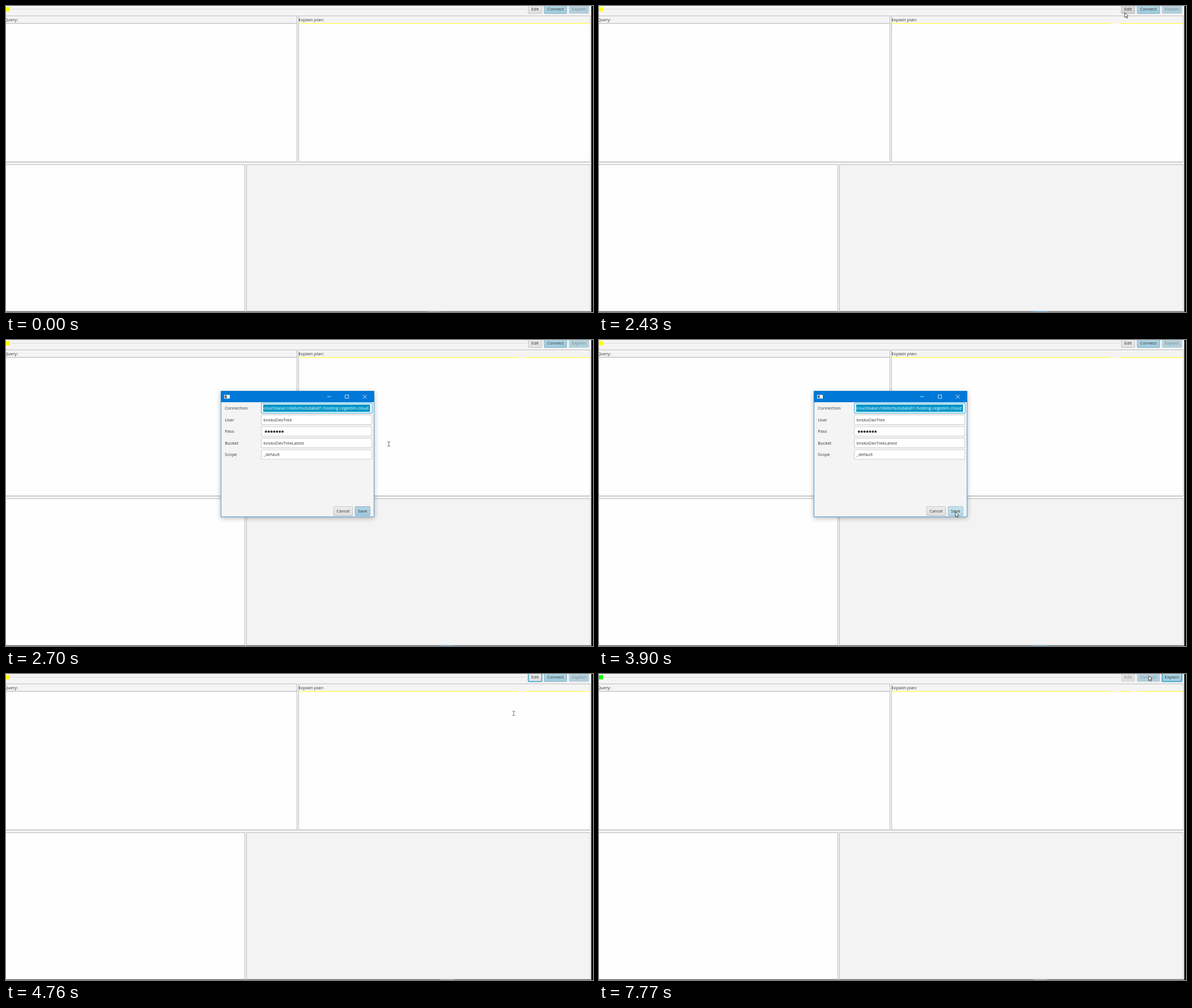
Recreate the animation shown at these times as an HTML page with a canvas. Size 1036 px wide and 541 px high, loop 8000 ms.

```html
<!DOCTYPE html>
<html lang="en">
<head>
<meta charset="utf-8">
<title>Query explain tool</title>
<style>
html, body { margin: 0; width: 100%; height: 100%; overflow: hidden; background: #f4f4f4; }
canvas { display: block; width: 1036px; height: 541px; }
</style>
</head>
<body>
<canvas id="stage" width="1036" height="541"></canvas>
<script>
const ctx = document.getElementById('stage').getContext('2d');
const LOOP = 8000;
const FONT = '7.6px "Open Sans", "Noto Sans", sans-serif';
const BG = '#f4f4f4', PAPER = '#fefefe', RULE = '#bcbcbc';
const BLUE = '#0078d7', FOCUS = '#1a94bf', INK = '#333';

// Moments at which the interface reacts, in ms.
const EDIT_DOWN = 1950, OPEN = 2435, SAVE = 3955, CLOSE = 4160;
const CONNECT = 5590, ONLINE = 7770;

const START = { x: 967, y: 440 };
const MOVES = [
  { from: 190, to: 400, x: 932, y: 298 },
  { from: 610, to: 1410, x: 921, y: 22, via: { x: 842, y: 100 } },
  { from: 1470, to: 1760, x: 929, y: 11 },
  { from: 2430, to: 2700, x: 676, y: 184 },
  { from: 2700, to: 3170, x: 545, y: 170 },
  { from: 3240, to: 3700, x: 629, y: 304 },
  { from: 4160, to: 4900, x: 940, y: 31 },
  { from: 4980, to: 5380, x: 970, y: 3 }
];

const ramp = (t, a, b) => Math.max(0, Math.min(1, (t - a) / (b - a)));
const within = (t, a, b) => t >= a && t < b;
const easeOut = u => 1 - (1 - u) ** 1.17;
const mix = (a, b, u) => ({ x: a.x + (b.x - a.x) * u, y: a.y + (b.y - a.y) * u });

function pointerAt(t) {
  let p = START;
  for (const move of MOVES) {
    if (t < move.from) break;
    const u = easeOut(ramp(t, move.from, move.to));
    p = move.via ? mix(mix(p, move.via, u), mix(move.via, move, u), u) : mix(p, move, u);
  }
  return p;
}

function rect(x, y, w, h, fill) {
  ctx.fillStyle = fill;
  ctx.fillRect(x, y, w, h);
}

function box(x, y, w, h, r, fill) {
  ctx.fillStyle = fill;
  ctx.beginPath();
  ctx.roundRect(x, y, w, h, r);
  ctx.fill();
}

function text(str, x, y, color = INK, align = 'left') {
  ctx.font = FONT;
  ctx.textAlign = align;
  ctx.fillStyle = color;
  ctx.fillText(str, x, y);
}

function stroke(path, color, width) {
  ctx.strokeStyle = color;
  ctx.lineWidth = width;
  ctx.stroke(new Path2D(path));
}

// mood: 0 at rest, 1 hovered, -1 pressed
function button(label, x, y, w, h, { main = false, mood = 0, focus = false, off = false } = {}) {
  const sat = main ? 49 : 0;
  const light = (main ? 77 : 90) + mood * 6;
  const tone = (s, l) => `hsl(198 ${s}% ${l}%)`;
  const inset = focus ? 1.1 : 0.8;
  ctx.save();
  if (off) ctx.globalAlpha = 0.45;
  if (focus) box(x - 0.7, y - 0.7, w + 1.4, h + 1.4, 2.5, '#8fcbe2');
  box(x, y, w, h, 2, focus ? FOCUS : tone(sat * 0.6, light - 16));
  const fill = ctx.createLinearGradient(0, y, 0, y + h);
  fill.addColorStop(0, tone(sat, light + 3));
  fill.addColorStop(1, tone(sat, light - 3));
  box(x + inset, y + inset, w - 2 * inset, h - 2 * inset, 1.5, fill);
  text(label, x + w / 2, y + h / 2 + 2.8, INK, 'center');
  ctx.restore();
}

function toolbar(t) {
  const online = t >= ONLINE;
  const editMood = within(t, EDIT_DOWN, OPEN + 50) ? -1 : within(t, 1600, EDIT_DOWN) ? 1 : 0;
  const connectMood = within(t, CONNECT, 5850) ? -1 : within(t, 5300, CONNECT) ? 1 : 0;
  rect(0, 2, 7, 7.5, online ? '#00ff00' : '#ffff00');
  rect(9, 5, 909, 1, '#d9d9d9');
  button('Edit', 921.5, -3, 24.5, 16.8,
    { mood: editMood, focus: within(t, CLOSE + 130, CONNECT), off: online });
  button('Connect', 949.5, -3, 40.5, 16.8,
    { main: true, mood: connectMood, focus: within(t, CONNECT, ONLINE), off: online });
  button('Explain', 993.5, -3, 35.5, 16.8, { main: true, focus: online, off: !online });
}

function pane(x, y, w, h, fill) {
  rect(x, y, w, h, RULE);
  rect(x + 1, y + 1, w - 2, h - 2, fill);
}

function panes(t) {
  pane(-1, 17, 515, 259, BG);
  pane(516, 17, 516, 259, BG);
  text('Query:', -2.6, 27);
  text('Explain plan:', 516.3, 27);

  rect(0, 30, 513, 1, RULE);
  rect(0, 31, 513, 244, PAPER);
  rect(0, 31, 513, 1, '#ededed');
  rect(517, 32, 514, 243, PAPER);
  rect(517, 30, 514, 1, '#ffff66');
  rect(517, 31, 514, 1, '#ffffa0');
  // Pale spots the pointer leaves on the yellow rule.
  if (t >= 1400) rect(905, 30, 12, 2, '#fafaf0');
  if (t >= 5040) rect(940, 30, 9, 2, '#fafaf0');
  rect(0, 276, 1032, 1, '#dcdcd6');

  pane(-1, 280, 423, 260, PAPER);
  pane(424, 280, 608, 260, '#f3f3f3');
}

function screenEdges(t) {
  rect(0, 540, 1033, 1, '#62707a');
  if (t < EDIT_DOWN) rect(743, 540, 24, 1, '#87939b');
  else rect(767, 540, 24, 1, t < 4700 ? '#4d9fd0' : '#a4acb1');
  rect(1033, 0, 3, 541, '#000');
}

function field(value, y, focus) {
  if (focus) {
    box(450, y - 9.5, 197, 19, 2, '#45b4da');
    box(451.2, y - 8.3, 194.6, 16.6, 1, '#fff');
    rect(454, y - 6.5, 188.5, 13, '#0096c9');
  } else {
    box(450.4, y - 8.8, 195.8, 17.6, 2, '#c0c0c0');
    box(451.2, y - 8, 194.2, 16, 1.4, '#fff');
  }
  text(value, 454.5, y + 2.7, focus ? '#fff' : INK);
}

function titleBar() {
  rect(379, 90, 271, 20, BLUE);
  rect(385, 97, 10, 6.5, '#f2f2f2');
  rect(386, 98, 3.6, 4.5, '#55606a');
  stroke('M567 100h6.5M598.6 97.1h6v6h-6zM630 97l6.4 6.4m0-6.4l-6.4 6.4', '#fff', 0.8);
}

function dialog(t) {
  const shown = ramp(t, OPEN, OPEN + 200) * (1 - ramp(t, CLOSE, CLOSE + 200));
  if (!shown) return;
  const scale = 1 - 0.08 * (1 - shown) ** 2;
  ctx.save();
  ctx.globalAlpha = shown;
  ctx.translate(515, 201.5);
  ctx.scale(scale, scale);
  ctx.translate(-515, -201.5);

  ctx.save();
  ctx.shadowColor = 'rgba(0,0,0,.3)';
  ctx.shadowBlur = 8;
  ctx.shadowOffsetY = 2;
  rect(379, 90, 271, 223, '#4f9fdd');
  ctx.restore();
  rect(380, 110, 269, 202, BG);
  titleBar();

  const saving = t >= SAVE;
  const rows = {
    Connection: 'couchbase://debchscbdata01.hosting.cegedim.cloud',
    User: 'bnskoDevTree',
    Pass: '',
    Bucket: 'bnskoDevTreeLatest',
    Scope: '_default'
  };
  Object.entries(rows).forEach(([label, value], i) => {
    const y = 120.5 + i * 20.5;
    text(label, 386.3, y + 2.7);
    field(value, y, i === 0 && !saving);
  });
  for (let i = 0; i < 7; i++) box(456.8 + i * 4.88, 160, 4, 4, 2, INK);

  button('Cancel', 577.8, 293.9, 34.4, 17);
  button('Save', 615.8, 293.9, 27, 17, { main: true, mood: t >= 3680 ? 1 : 0, focus: saving });
  ctx.restore();
}

function overText({ x, y }, t) {
  const inDialog = within(t, OPEN, CLOSE) && within(x, 380, 650) && within(y, 90, 313);
  return inDialog ? x > 450 && within(y, 111, 212) : within(y, 24, 275);
}

function pointer(t) {
  if (t < MOVES[0].from) return;
  const p = pointerAt(t);
  ctx.save();
  ctx.translate(p.x, p.y);
  if (overText(p, t)) {
    stroke('M0-3.5v7M-2.5-3.7h5M-2.5 3.7h5', '#555', 0.8);
  } else {
    const arrow = new Path2D('M0 0V8.6L2 6.8L3.4 9.8L4.8 9.2L3.5 6.3L6.2 6.2Z');
    ctx.fillStyle = '#fff';
    ctx.fill(arrow);
    stroke(arrow, '#222', 0.8);
  }
  ctx.restore();
}

function draw(t) {
  rect(0, 0, 1036, 541, BG);
  toolbar(t);
  panes(t);
  screenEdges(t);
  dialog(t);
  pointer(t);
}

const begin = performance.now();
function tick() {
  draw((performance.now() - begin) % LOOP);
  requestAnimationFrame(tick);
}
tick();
</script>
</body>
</html>
```
